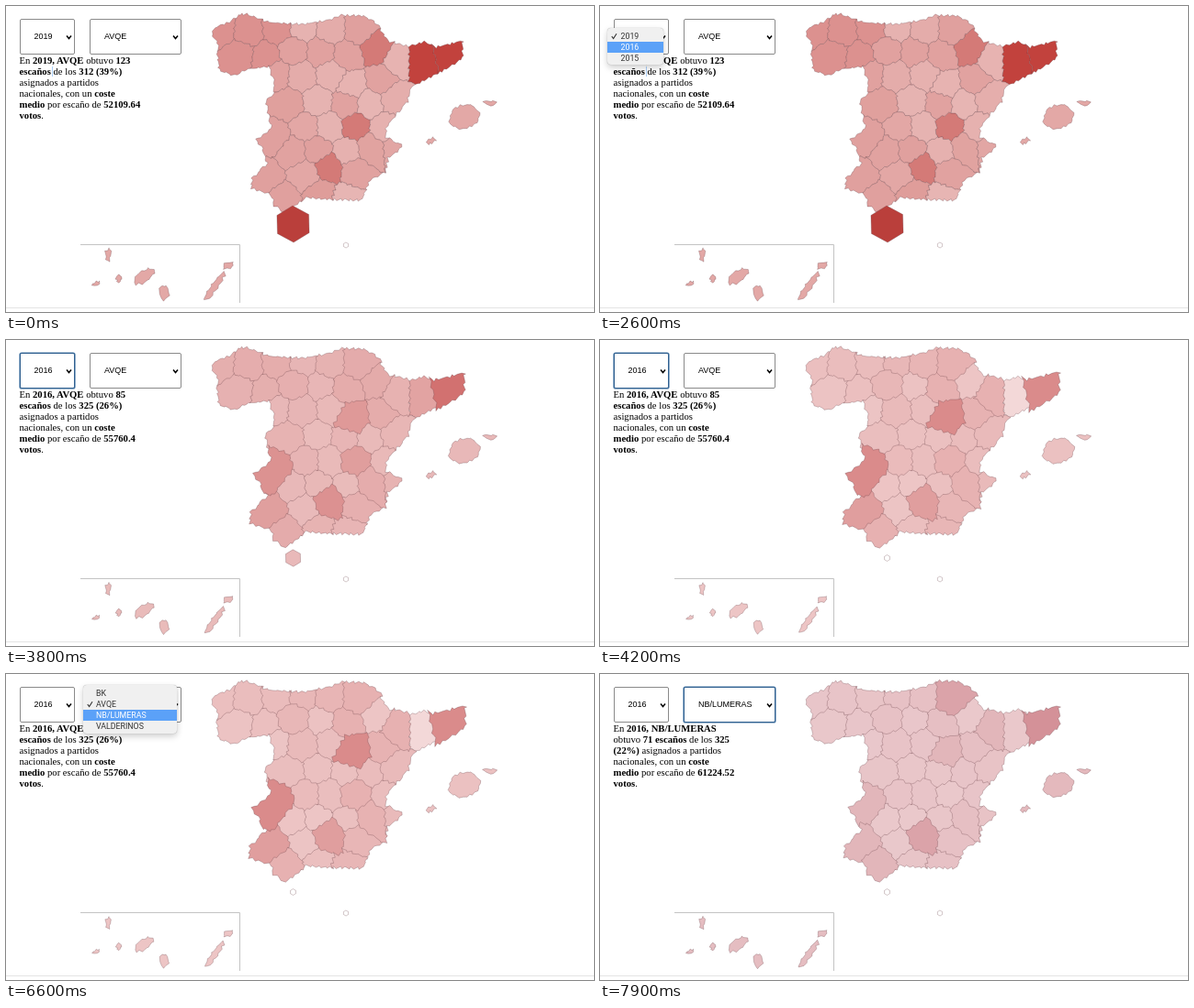
An HTML page with a canvas that plays this animation: 640x334 px, repeating every 8 s.

```html
<!DOCTYPE html>
<html lang="es">
<head>
<meta charset="utf-8">
<style>
  html, body { margin: 0; width: 100%; height: 100%; overflow: hidden; background: #fff; }
  #stage { position: relative; width: 640px; height: 334px; overflow: hidden; color: #000; }
  #stage > * { position: absolute; box-sizing: border-box; }
  .select { top: 13.5px; height: 39px; border: 1px solid #8a8a8a; border-radius: 2px;
    font: 9px/37px "Liberation Sans", Arial, sans-serif; padding-left: 15px; background: #fff; }
  .select.focus { border-color: #2f5f8f; box-shadow: 0 0 0 .6px #4a7aa8; }
  .select svg { position: absolute; right: 2px; top: 16px; }
  #year { left: 14.5px; width: 60px; }
  #party { left: 91px; width: 100px; }
  #summary { left: 14.5px; top: 53px; white-space: pre;
    font: 10.67px/12px "Liberation Serif", "Times New Roman", serif; }
  #caret { left: 50px; top: 66px; width: 1px; height: 11px; background: #a9cdf8; }
  .menu { padding: 2.6px 0 2px; border-radius: 4px; background: #f0f0f0; color: #333;
    font: 8.8px/12px Roboto, sans-serif; box-shadow: 0 0 1px #999, 0 3px 7px rgba(0,0,0,.2); overflow: hidden; }
  .menu div { position: relative; padding-left: 14.5px; height: 12px; }
  .menu .on { background: #5ba1f8; color: #fff; }
  .menu svg { position: absolute; left: 4px; top: 2px; }
  #years { left: 8px; top: 24px; width: 61px; height: 40px; }
  #parties { left: 83.5px; top: 12px; width: 102px; height: 53px; }
</style>
</head>
<body>
<div id="stage">
  <canvas id="map" width="640" height="334"></canvas>
  <div id="summary"></div>
  <div id="caret"></div>
  <div id="year" class="select"></div>
  <div id="party" class="select"></div>
  <div id="years" class="menu"></div>
  <div id="parties" class="menu"></div>
</div>
<script>
const LOOP = 8000, MORPH = 900, YEAR_CHANGE = 3300, PARTY_CHANGE = 7000;
const $ = id => document.getElementById(id);
const ctx = $('map').getContext('2d');
const PARTIES = ['BK', 'AVQE', 'NB/LUMERAS', 'VALDERINOS'];

const lerp = (a, b, k) => a + (b - a) * k;
const toPath = points => new Path2D('M' + points.join('L') + 'Z');
let seed = 11;
const random = () => (seed = seed * 16807 % 2147483647) / 2147483647;

const coast = `224,30 229,22 244,18 254,9 262,9 287,18 322,20 348,16 366,10 390,11 405,20 415,38
  438,44 456,39 468,45 497,38 497,56 478,70 441,88 437,104 413,133 414,143 432,153 416,166
  413,181 396,190 387,212 350,211 328,209 303,225 292,218 289,206 267,199 268,188 284,172
  278,152 271,146 289,134 283,104 291,96 292,84 286,66 262,69 248,76 232,70 230,50 232,42`
  .split(/\s+/).map(p => p.split(',').map(Number));

// provinces that stand out: x, y, shade in each of the three views
const notable = [
  [402, 46, '511'], [450, 60, '801'], [484, 52, '844'], [384, 27, '323'], [427, 60, '222'],
  [376, 87, '242'], [380, 131, '521'], [293, 143, '342'], [351, 176, '533'], [283, 188, '332'], [301, 210, '322']
].map(([x, y, shades]) => ({ x, y, shade: [...shades].map(Number) }));

// the others stand on a loose staggered grid
function ordinary() {
  const outline = toPath(coast), found = [];
  for (let row = 0; row < 8; row++) {
    for (let col = 0; col < 10; col++) {
      const x = 238 + col * 29 + row % 2 * 14 + random() * 8 - 4, y = 26 + row * 26 + random() * 8 - 4;
      const weight = random(), northwest = x < 312 && y < 72;
      const free = notable.every(p => Math.hypot(p.x - x, p.y - y) > 20);
      if (free && ctx.isPointInPath(outline, x, y)) {
        found.push({ x, y, shade: [northwest ? 3.8 : 1.9 + 1.3 * random(), 1 + weight, 1 + weight / 2] });
      }
    }
  }
  return found;
}

// keeps the part of poly that lies nearer to a than to b
function nearer(poly, a, b) {
  const side = ([x, y]) => (x - (a.x + b.x) / 2) * (b.x - a.x) + (y - (a.y + b.y) / 2) * (b.y - a.y);
  return poly.flatMap((p, i) => {
    const q = poly[(i + 1) % poly.length], u = side(p), v = side(q), out = u <= 0 ? [p] : [];
    if (u * v < 0) out.push([0, 1].map(n => lerp(p[n], q[n], u / (u - v))));
    return out;
  });
}

// splits edges and shifts each point by a fixed wobble, so neighbours still fit
function roughen(poly) {
  return poly.flatMap((p, i) => {
    const q = poly[(i + 1) % poly.length];
    const n = Math.max(1, Math.round(Math.hypot(q[0] - p[0], q[1] - p[1]) / 3));
    return Array.from({ length: n }, (_, k) => {
      const x = lerp(p[0], q[0], k / n), y = lerp(p[1], q[1], k / n);
      return [x + 1.2 * Math.sin(1.3 * y + .7 * x), y + 1.2 * Math.sin(1.1 * x - .8 * y)];
    });
  });
}

function oval(x, y, rx, ry, tilt, corners) {
  return Array.from({ length: corners }, (_, i) => {
    const a = i / corners * 2 * Math.PI, u = rx * Math.cos(a), v = ry * Math.sin(a);
    return [x + u * Math.cos(tilt) - v * Math.sin(tilt), y + u * Math.sin(tilt) + v * Math.cos(tilt)];
  });
}

const island = (shade, size) => ([x, y, rx, ry, tilt]) =>
  ({ x, y, shade, size, path: toPath(roughen(oval(x, y, rx, ry, tilt, 12))) });
const enclave = (x, y, r, shade, size) =>
  ({ x, y, shade, size, path: toPath(oval(x, y, r, r, -.55, 6)) });

const provinces = [...notable, ...ordinary()];
const regions = [
  ...provinces.map(p => ({
    ...p,
    size: [1, .95 + .07 * p.shade[1], .95 + .07 * p.shade[2]],
    path: toPath(roughen(provinces.reduce((poly, other) => other === p ? poly : nearer(poly, p, other), coast)))
  })),
  // x, y, radii and tilt of each island
  ...[[499, 121, 17, 13, -.3], [527, 106, 7, 2.5, .1], [463, 147, 5, 3, -.6]]
    .map(island([2.6, 1.2, 1.8], [1, 1.04, 1])),
  ...[[111, 272, 3, 7, 0], [98, 303, 5, 2, -.4], [123, 297, 3, 4, 0], [150, 295, 13, 6, -.6],
    [172, 313, 6, 8, 0], [242, 283, 6, 3, -.4], [227, 306, 19, 3.5, -.95]]
    .map(island([2.6, 1, 1.6], [1, .9, .95])),
  enclave(312.5, 238, 20, [8.4, -2, -2], [1, .17, .17]),
  enclave(370, 261, 3, [-2, -2, -2], [1, 1, 1])
];

function ease(k) {
  k = Math.min(1, Math.max(0, k));
  return k < .5 ? 4 * k ** 3 : 1 - 4 * (1 - k) ** 3;
}

function line(color, ...points) {
  ctx.beginPath();
  points.forEach(p => ctx.lineTo(...p));
  ctx.strokeStyle = color;
  ctx.lineWidth = 1;
  ctx.stroke();
}

function drawMap(t) {
  const a = ease((t - YEAR_CHANGE) / MORPH), b = ease((t - PARTY_CHANGE) / MORPH);
  const blend = v => v[0] + (v[1] - v[0]) * a + (v[2] - v[1]) * b;
  const hue = blend([2, 0, -6]), sat = blend([52, 52, 44]);
  ctx.setTransform(1, 0, 0, 1, 0, 0);
  ctx.clearRect(0, 0, 640, 334);
  line('#c4c4c4', [81, 260.5], [254.5, 260.5], [254.5, 324]);
  line('#e4e4e4', [0, 329.5], [640, 329.5]);
  regions.map(r => ({ ...r, s: blend(r.size) })).sort((p, q) => p.s - q.s).forEach(({ x, y, path, shade, s }) => {
    ctx.setTransform(s, 0, 0, s, x * (1 - s), y * (1 - s));
    ctx.fillStyle = `hsl(${hue} ${sat}% ${90 - 5 * blend(shade)}%)`;
    ctx.fill(path);
    ctx.strokeStyle = 'rgba(105,65,70,.5)';
    ctx.lineWidth = .6 / s;
    ctx.stroke(path);
  });
}

const icon = (d, w) => `<svg width="7" height="8" fill="none" stroke="currentColor" stroke-width="${w}"><path d="${d}"/></svg>`;
const chevron = icon('M1 1.5L3.5 4.5 6 1.5', 1.5), check = icon('M.8 4.2L2.6 6.5 6 1.2', 1.1);

const summary = (head, cost) =>
  `En <b>${head}asignados a partidos\nnacionales, con un <b>coste\nmedio</b> por escaño de <b>${cost}\nvotos</b>.`;
const summaries = [
  summary(`2019, ${PARTIES[1]}</b> obtuvo <b>123\nescaños</b> de los <b>312 (39%)</b>\n`, '52109.64'),
  summary(`2016, ${PARTIES[1]}</b> obtuvo <b>85\nescaños</b> de los <b>325 (26%)</b>\n`, '55760.4'),
  summary(`2016, ${PARTIES[2]}</b>\nobtuvo <b>71 escaños</b> de los <b>325\n(22%)</b> `, '61224.52')
];

function setHTML(id, html) {
  const el = $(id);
  if (el.shown !== html) el.innerHTML = el.shown = html;
}

function setSelect(id, label, focused) {
  setHTML(id, label + chevron);
  $(id).classList.toggle('focus', focused);
}

function setMenu(id, open, items, checked, hovered) {
  $(id).style.display = open ? 'block' : 'none';
  setHTML(id, items.map((item, i) =>
    `<div class="${i === hovered ? 'on' : ''}">${i === checked ? check : ''}${item}</div>`).join(''));
}

function frame(now) {
  const t = now % LOOP;
  const view = t > PARTY_CHANGE + 50 ? 2 : t > YEAR_CHANGE + 50 ? 1 : 0;
  drawMap(t);
  setHTML('summary', summaries[view]);
  $('caret').style.display = view ? 'none' : 'block';
  setSelect('year', view ? '2016' : '2019', view === 1 && t < 4500);
  setSelect('party', PARTIES[view === 2 ? 2 : 1], view === 2);
  setMenu('years', t >= 1500 && t < 3250, ['2019', '2016', '2015'], 0, t < 2600 ? 0 : 1);
  setMenu('parties', t >= 4500 && t < 6950, PARTIES, 1, t < 6200 ? 1 : 2);
  requestAnimationFrame(frame);
}
requestAnimationFrame(frame);
</script>
</body>
</html>
```
